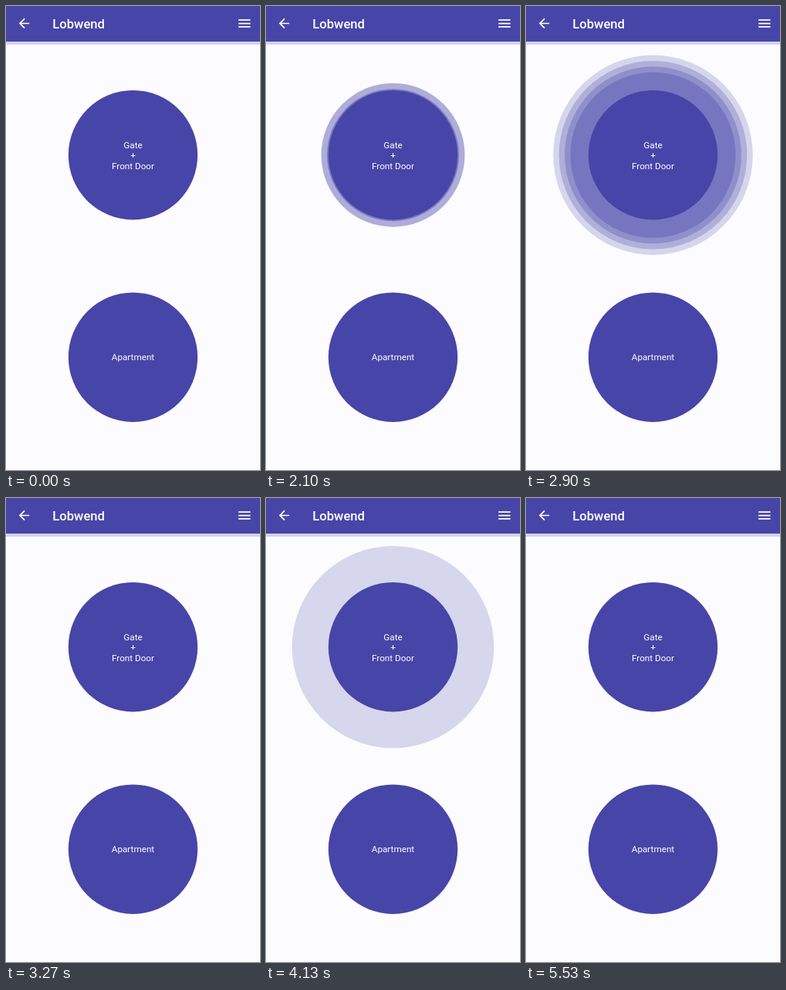
Write an HTML page that moves like this. It is 329 by 600 pixels and loops after 5.56 s.

```html
<!DOCTYPE html>
<html lang="en">
<head>
<meta charset="utf-8">
<title>Door buttons</title>
<style>
  html, body { margin: 0; width: 100%; height: 100%; overflow: hidden; background: #fcfcff; }
  svg { display: block; width: 100vw; height: 100vh; }
  text { font-family: Roboto, sans-serif; fill: #fff; }
  .title { font-size: 16.6px; font-weight: 500; }
  .label { font-size: 11.7px; text-anchor: middle; }
  .indigo { fill: #4745a8; }
  .icon { fill: #fff; }
</style>
</head>
<body>
<svg viewBox="0 0 329 600">
  <rect width="329" height="600" fill="#fcfcff"/>
  <rect y="46" width="329" height="4" fill="#d3d2f2"/>
  <rect class="indigo" width="329" height="46"/>
  <path class="icon" transform="translate(13.4 12.4) scale(.84)"
        d="M20 11H7.83l5.59-5.59L12 4l-8 8 8 8 1.41-1.41L7.83 13H20z"/>
  <text class="title" x="60.3" y="29">Lobwend</text>
  <path class="icon" transform="translate(298.5 12.2) scale(.86)"
        d="M3 18h18v-2H3zM3 13h18v-2H3zM3 6v2h18V6z"/>
  <g id="rings"></g>
  <circle class="indigo" cx="164.5" cy="192.7" r="83.7"/>
  <text class="label" x="164.5" y="184">Gate</text>
  <text class="label" x="164.5" y="197.3">+</text>
  <text class="label" x="164.5" y="210.6">Front Door</text>
  <circle class="indigo" cx="164.5" cy="454.2" r="83.7"/>
  <text class="label" x="164.5" y="458.4">Apartment</text>
</svg>
<script>
  const LOOP = 5560;
  const SPEED = 0.0935;        // px per ms
  const BUTTON_RADIUS = 83.5;
  const MAX_RADIUS = 131.7;
  const FADE_RADIUS = 165;
  const RING_GAP = 7.4;
  const PULSE_PERIOD = 976;
  const TAP = 2000, RESTART = 2412, STOP = 5300;

  const group = document.getElementById("rings");
  const rings = Array.from({ length: 4 }, () => {
    const ring = document.createElementNS("http://www.w3.org/2000/svg", "circle");
    ring.setAttribute("class", "indigo");
    ring.setAttribute("cx", 164.5);
    ring.setAttribute("cy", 192.7);
    return group.appendChild(ring);
  });

  // Radius of the leading ring; the others trail it by a fixed gap.
  function leadRadius(t) {
    if (t < TAP || t >= STOP) return 0;
    const age = t < RESTART ? t - TAP : (t - RESTART) % PULSE_PERIOD;
    return BUTTON_RADIUS + SPEED * age;
  }

  function render(t) {
    const lead = leadRadius(t);
    rings.forEach((ring, i) => {
      const radius = lead - i * RING_GAP;
      const visible = radius > BUTTON_RADIUS && radius <= MAX_RADIUS;
      ring.setAttribute("r", visible ? radius : 0);
      ring.setAttribute("opacity", visible ? 1 - radius / FADE_RADIUS : 0);
    });
  }

  const start = performance.now();
  function tick() {
    render((performance.now() - start) % LOOP);
    requestAnimationFrame(tick);
  }
  tick();
</script>
</body>
</html>
```
